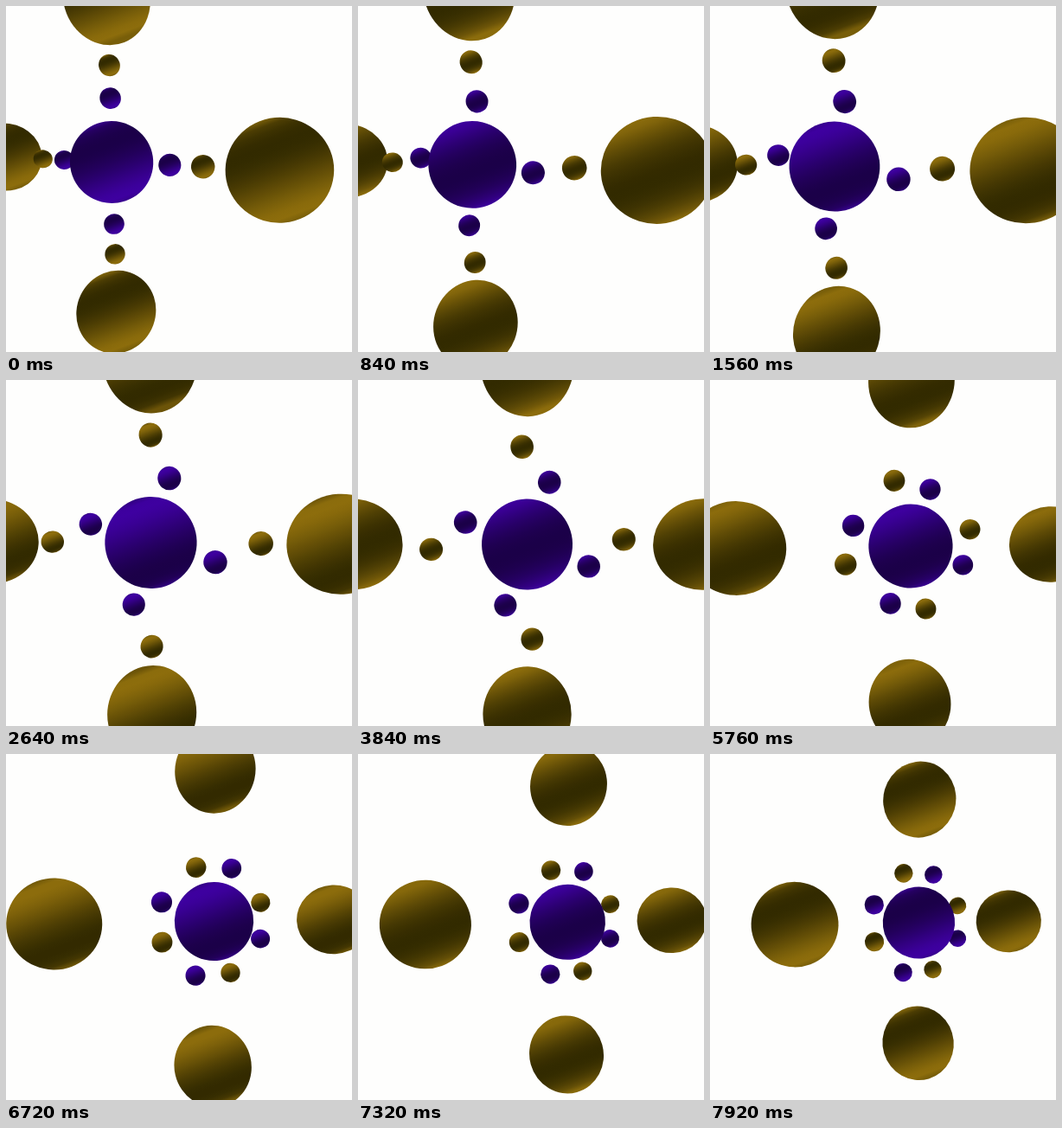
Write an HTML page with a canvas that moves like this. It is 400 px wide and 400 px high and loops after 8 s.

```html
<!DOCTYPE html>
<html>
<head>
<meta charset="utf-8">
<style>
html, body { margin: 0; width: 100%; height: 100%; overflow: hidden; background: #fefefd; }
canvas { display: block; width: 100vmin; height: 100vmin; }
</style>
</head>
<body>
<canvas id="stage" width="400" height="400"></canvas>
<script>
const ctx = document.getElementById("stage").getContext("2d");
const LOOP = 8000, STEP = 120, FOCAL = 460, MID = 200;
const GOLD = [[50, 42, 0], [141, 109, 12]];
const PURPLE = [[27, 0, 72], [62, 0, 160]];

// Camera path: each track has one value per key time (seconds).
const TIMES = [0, 1.56, 2.64, 3.84, 5.76, 6.72, 7.92];
const TRACKS = {
  x: [122.9, 144.7, 167.9, 195.6, 231.6, 240.1, 241.1],
  y: [180.7, 185.7, 188.1, 190.1, 192.1, 193.6, 195],
  radius: [47.5, 52, 53, 52.5, 48.5, 45.5, 41.5],
  yaw: [0.6, 0.361, 0.2, 0.01, -0.274, -0.392, -0.545],
  pitch: [0.115, 0.087, 0.07, 0.062, 0.062, 0.058, 0.035],
  roll: [0.03, 0.0125, 0.006, 0, -0.005, -0.008, -0.006],
  shade: [-0.5, 0.5, 0.65, 0.1, 0.4, 0.6, -0.5]
};

const clamp = (v, lo, hi) => Math.min(hi, Math.max(lo, v));

// Smooth Hermite curve through the key values.
function sample(values, t) {
  const last = TIMES.length - 1;
  const secant = i => (values[i + 1] - values[i]) / (TIMES[i + 1] - TIMES[i]);
  const slope = i => {
    if (i === 0) return 1.5 * secant(0) - 0.5 * secant(1);
    if (i === last) return 1.5 * secant(last - 1) - 0.5 * secant(last - 2);
    const before = TIMES[i] - TIMES[i - 1], after = TIMES[i + 1] - TIMES[i];
    return (secant(i - 1) * after + secant(i) * before) / (before + after);
  };
  let i = 0;
  while (i < last - 1 && t > TIMES[i + 1]) i++;
  const h = TIMES[i + 1] - TIMES[i], u = (t - TIMES[i]) / h, v = 1 - u;
  return v * v * (1 + 2 * u) * values[i] + u * u * (1 + 2 * v) * values[i + 1]
    + h * u * v * (v * slope(i) - u * slope(i + 1));
}

// Rings in units of the central radius: each closes in, then turns.
function ringsAt(t) {
  return [
    { size: 0.25, color: PURPLE, distance: Math.max(1.44, 1.54 - 0.28 * t),
      turn: clamp(0.1075 * t, 0, 0.343) },
    { size: 0.25, color: GOLD, distance: clamp(2.31 - 0.28 * (t - 3.17), 1.43, 2.31),
      turn: -clamp(0.105 * (t - 3.34), 0, 0.345) },
    { size: 1, color: GOLD, distance: Math.min(3.8, 3.8 - 0.3 * (t - 6.48)), turn: 0 }
  ];
}

function project(cam, X, Y) {
  const x = X * Math.cos(cam.yaw);
  const y = X * Math.sin(cam.yaw) * Math.sin(cam.pitch) + Y * Math.cos(cam.pitch);
  const near = X * Math.sin(cam.yaw) * Math.cos(cam.pitch) - Y * Math.sin(cam.pitch);
  const depth = 1 - near / FOCAL;
  return {
    depth,
    x: cam.x + (x + cam.roll * y) / depth,
    y: cam.y + (y - cam.roll * x) / depth
  };
}

function surface([dark, bright], radius, shade) {
  const dx = radius * 0.35, dy = radius * 0.94;
  const gradient = ctx.createLinearGradient(-dx, -dy, dx, dy);
  for (let i = 0; i <= 16; i++) {
    const s = i / 8 - 1;
    const light = 0.5 - 0.5 * Math.cos(2 * (Math.asin(s) - shade));
    const rgb = dark.map((c, k) => Math.round(c + (bright[k] - c) * light));
    gradient.addColorStop(i / 16, `rgb(${rgb})`);
  }
  return gradient;
}

// A sphere seen off-axis is an ellipse stretched away from the view centre.
function drawBall(ball, shade) {
  const shift = 1 / (1 - (ball.radius / FOCAL) ** 2);
  const dx = (ball.x - MID) * shift, dy = (ball.y - MID) * shift;
  const stretch = Math.hypot(1, Math.hypot(dx, dy) / FOCAL);
  ctx.save();
  ctx.translate(MID + dx, MID + dy);
  ctx.fillStyle = surface(ball.color, ball.radius, shade);
  ctx.beginPath();
  ctx.ellipse(0, 0, ball.radius * stretch, ball.radius, Math.atan2(dy, dx), 0, 2 * Math.PI);
  ctx.fill();
  ctx.restore();
}

function draw(t) {
  const cam = {};
  for (const name in TRACKS) cam[name] = sample(TRACKS[name], t);
  const balls = [{ x: cam.x, y: cam.y, depth: 1, radius: cam.radius, color: PURPLE }];
  for (const ring of ringsAt(t)) {
    for (let arm = 0; arm < 4; arm++) {
      const angle = arm * Math.PI / 2 + ring.turn, d = ring.distance * cam.radius;
      const spot = project(cam, d * Math.cos(angle), d * Math.sin(angle));
      balls.push({ ...spot, radius: cam.radius * ring.size / spot.depth, color: ring.color });
    }
  }
  ctx.fillStyle = "#fefefd";
  ctx.fillRect(0, 0, 400, 400);
  balls.sort((a, b) => b.depth - a.depth).forEach(ball => drawBall(ball, cam.shade));
}

const start = performance.now();
function frame() {
  const elapsed = (performance.now() - start) % LOOP;
  draw(Math.floor(elapsed / STEP) * STEP / 1000);
  requestAnimationFrame(frame);
}
frame();
</script>
</body>
</html>
```
